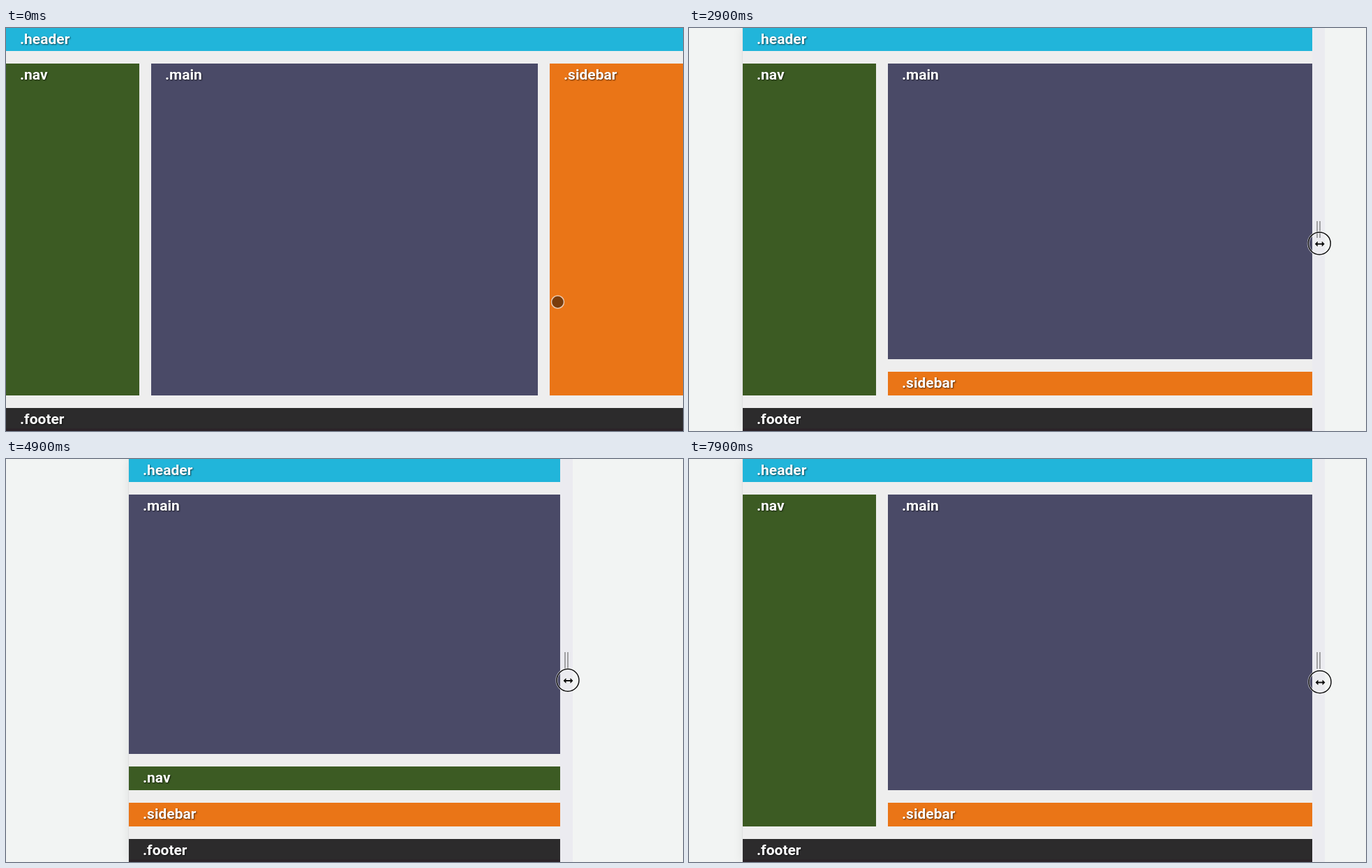
Write an HTML page that moves like this. It is 970 by 578 pixels and loops after 8000 ms.

```html
<!DOCTYPE html>
<html lang="en">
<head>
<meta charset="utf-8">
<title>Responsive grid</title>
<style>
  html, body { margin: 0; width: 100%; height: 100%; overflow: hidden; background: #f2f4f3; }
  #stage { position: relative; width: 970px; height: 578px; overflow: hidden; }
  #stage div, #cursor { position: absolute; }
  #page { top: 0; height: 578px; background: #eee; box-shadow: 0 0 0 1px #e0e1e1, 0 0 14px rgba(0, 0, 0, .09); }
  #clip { inset: 0; overflow: hidden; }
  #clip div {
    box-sizing: border-box; padding-left: 20px; white-space: nowrap;
    font: 600 21px/32px Roboto, "Open Sans", sans-serif; color: #fff;
    text-shadow: 1px 1px 2px rgba(0, 0, 0, .65);
  }
  #header { background: #21b5da; }
  #nav { background: #3c5b23; }
  #main { background: #4a4a67; }
  #sidebar { background: #ea7517; }
  #footer { background: linear-gradient(#2c2b2c 29px, #2b2228 30px); }
  #handle { top: 0; width: 18px; height: 578px; background: #ebebf0; }
  #handle::before {
    content: ""; position: absolute; left: 6px; top: 277px; width: 2px; height: 24px;
    border: solid #a0a0a2; border-width: 0 2px;
  }
  #cursor { left: -20px; top: -20px; width: 40px; height: 40px; }
</style>
</head>
<body>
<div id="stage">
  <div id="page">
    <div id="clip">
      <div id="header">.header</div>
      <div id="nav">.nav</div>
      <div id="main">.main</div>
      <div id="sidebar">.sidebar</div>
      <div id="footer">.footer</div>
    </div>
  </div>
  <div id="handle"></div>
  <svg id="cursor" viewBox="-20 -20 40 40">
    <circle id="dot" r="9" fill="#000" fill-opacity=".48" stroke="#fff" stroke-opacity=".65" stroke-width="1.5"/>
    <g id="ring">
      <circle r="16" fill="none" stroke="#fff" stroke-opacity=".6" stroke-width="3.2"/>
      <circle r="16" fill="none" stroke="#111" stroke-width="1.5"/>
      <path d="M-6.5 .8L-2.5-3.2V-.2H3.5V-3.2L7.5 .8L3.5 4.8V1.8H-2.5V4.8Z"
            fill="#111" stroke="#fff" stroke-width="1.4" paint-order="stroke"/>
    </g>
  </svg>
</div>
<script>
  const LOOP = 8000, STEP = 100, WIDTH = 970, GAP = 17, NAV = 191;
  const GRIP = 11;        // pointer's place on the handle
  const GRAB = 1000;      // when the pointer reaches the handle
  const $ = id => document.getElementById(id);

  // each drag eases the margin to a new size; the pointer runs ahead by lead
  const drags = [
    { start: 1500, time: 680, to: 77, lead: 310 },
    { start: 3050, time: 900, to: 162, lead: 200 },
    { start: 4500, time: 400, to: 176, lead: 200 },
    { start: 5350, time: 800, to: 145, lead: 200 },
    { start: 6600, time: 1160, to: 77, lead: 200 }
  ];

  const mix = (a, b, p) => a + (b - a) * p;

  function ease(p) {
    p = Math.min(1, Math.max(0, p));
    return p * p * (3 - 2 * p);
  }

  const marginAt = (t, ahead) => drags.reduce(
    (m, d) => mix(m, d.to, ease((t + ahead * d.lead - d.start) / d.time)), 0);

  function pointerAt(t) {
    const glide = ease(t / GRAB);
    const sink = 30 * (1 - Math.exp(-Math.max(0, t - 1450) / 1450));
    return [
      mix(790.5, WIDTH + GRIP, glide) - marginAt(t, 1),
      mix(393, 290, glide) + sink
    ];
  }

  function place(id, left, top, right, bottom) {
    Object.assign($(id).style, {
      left: left + "px", top: top + "px",
      width: right - left + "px", height: bottom - top + "px"
    });
  }

  function layout(w, left) {
    place("header", 0, 0, w, 33);
    place("footer", 0, 545, w, 578);
    const inner = NAV + GAP;
    if (w > 890) {
      // the columns trail the page edge while it shrinks
      const side = Math.round(WIDTH - left / 2) - NAV;
      place("nav", 0, 51, NAV, 527);
      place("main", inner, 51, side - GAP, 527);
      place("sidebar", side, 51, side + NAV, 527);
    } else if (w > 640) {
      place("nav", 0, 51, NAV, 527);
      place("main", inner, 51, w, 475);
      place("sidebar", inner, 493, w, 527);
    } else {
      place("main", 0, 51, w, 423);
      place("nav", 0, 441, w, 475);
      place("sidebar", 0, 493, w, 527);
    }
  }

  function draw() {
    const t = Math.floor(performance.now() % LOOP / STEP) * STEP;
    const left = Math.round(marginAt(t, 0));
    const w = WIDTH - 2 * left;
    place("page", left, 0, left + w, 578);
    $("handle").style.left = left + w + "px";
    layout(w, left);

    const [x, y] = pointerAt(t);
    $("cursor").style.transform = `translate(${x}px, ${y}px)`;
    $("dot").style.display = t < GRAB ? "" : "none";
    $("ring").style.display = t < GRAB ? "none" : "";
    requestAnimationFrame(draw);
  }
  draw();
</script>
</body>
</html>
```
